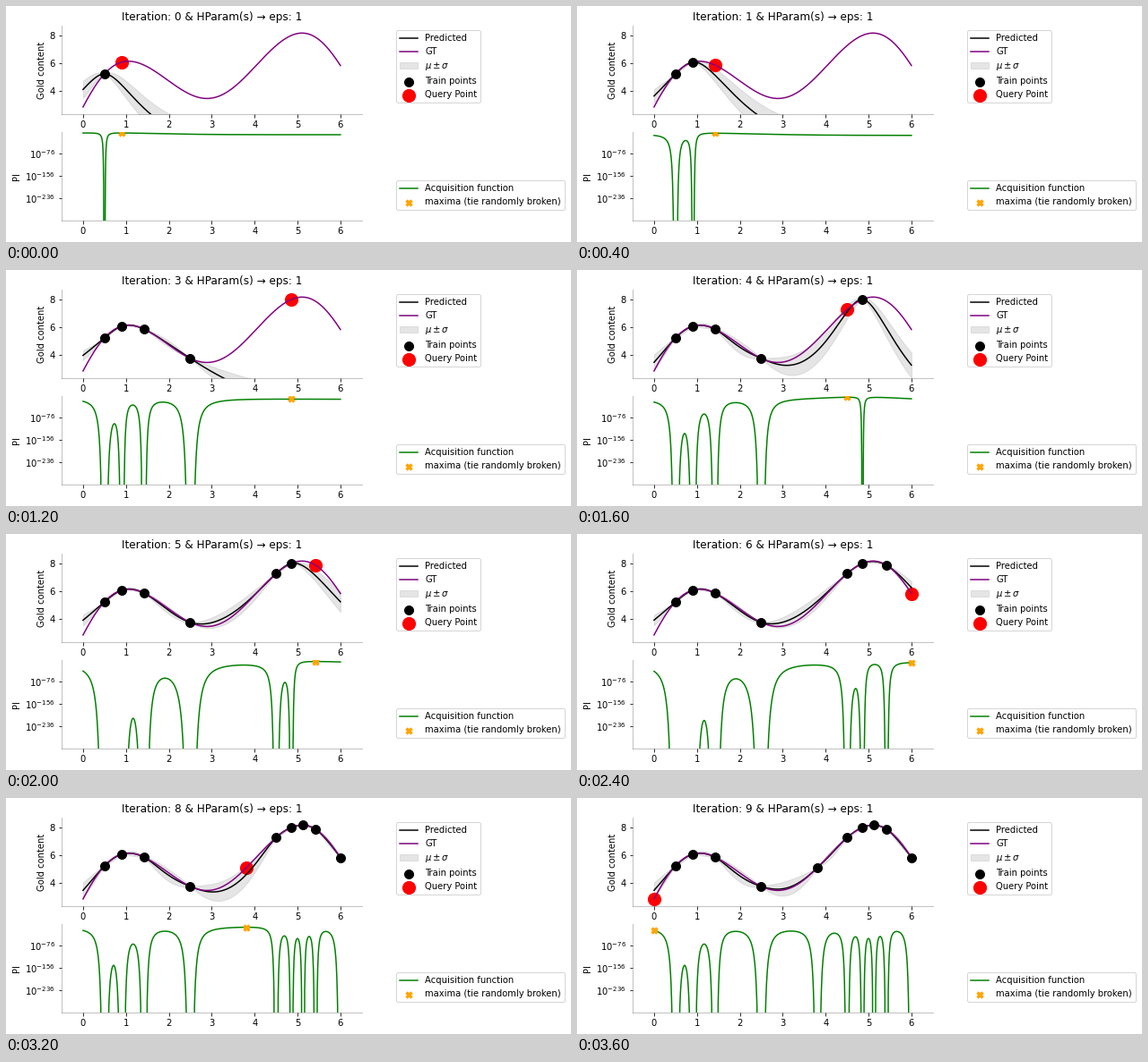
Recreate the animation shown at these times as a matplotlib script. Size 630 by 264 pixels, loop 4 s.

```python
import math

import numpy as np
import matplotlib.pyplot as plt
from matplotlib.animation import FuncAnimation

W, H, DPI = 630, 264, 72
EPS = 1
plt.rcParams["font.family"] = "DejaVu Sans"

# Surveyed gold content, smoothed into the ground-truth curve
SURVEY = np.array([
    (0, 2.85), (0.5, 5.26), (0.91, 6.1), (1.05, 6.15), (1.42, 5.89),
    (2.5, 3.76), (2.9, 3.47), (3.81, 5.12), (4.5, 7.3), (4.86, 8.02),
    (5.13, 8.2), (5.42, 7.9), (6, 5.85),
])
# Sampling order, and the kernel length scale fitted at each iteration
SAMPLES = np.array([0.5, 0.91, 1.42, 2.5, 4.86, 4.5, 5.42, 6, 5.13, 3.81, 0])
LENGTHS = [1, 1.21, 1.7, 1.7, 1, 1.53, 1.55, 1.57, 1, 1]


def rbf(a, b, length=1.2):
    return np.exp(-0.5 * ((a[:, None] - b) / length) ** 2)


def matern(a, b, length):
    s = math.sqrt(3) * np.abs(a[:, None] - b) / length
    return (1 + s) * np.exp(-s)


def ground_truth(x):
    sx, sy = SURVEY.T
    k = rbf(sx, sx) + 5e-5 * np.eye(len(sx))
    return 5.5 + rbf(x, sx) @ np.linalg.solve(k, sy - 5.5)


def posterior(x, tx, ty, length):
    k = matern(tx, tx, length) + 1e-10 * np.eye(len(tx))
    kx = matern(tx, x, length)
    w = np.linalg.solve(k, kx)
    var = 1 - np.sum(kx * w, axis=0)
    return ty @ w, np.sqrt(np.maximum(var, 1e-10))


def log_pi(mu, sigma, best):
    """log10 of the probability of improvement."""
    z = (mu - best - EPS) / sigma
    p = [0.5 * math.erfc(-v / math.sqrt(2)) for v in z]
    return np.array([math.log10(v) if v > 0 else -1000 for v in p])


xs = np.linspace(0, 6, 1001)
gt = ground_truth(xs)
sample_y = ground_truth(SAMPLES)

fig = plt.figure(figsize=(W / DPI, H / DPI), dpi=DPI, facecolor="white")


def make_axes(top, ylim, ylabel):
    height = 98.84
    ax = fig.add_axes([62 / W, 1 - (top + height) / H, 334.8 / W, height / H])
    ax.set(xlim=(-0.5, 6.5), ylim=ylim, ylabel=ylabel, xticks=range(7))
    ax.spines[["top", "right"]].set_visible(False)
    ax.spines[["left", "bottom"]].set_alpha(0.3)
    return ax


top = make_axes(22.2, (2.33, 8.72), "Gold content")
top.set_yticks([4, 6, 8])
low = make_axes(140.8, (-315.5, 0.5), "PI")
powers = [-76, -156, -236]
low.set_yticks(powers, [rf"$\mathdefault{{10^{{{p}}}}}$" for p in powers])

mean, = top.plot([], [], color="black", label="Predicted")
top.plot(xs, gt, color="purple", label="GT")
band = top.fill_between(xs, gt, gt, color="grey", alpha=0.2,
                        label=r"$\mu \pm \sigma$")
train = top.scatter([], [], s=100, color="black", zorder=10,
                    label="Train points")
query = top.scatter([], [], s=200, color="red", label="Query Point")
acq, = low.plot([], [], color="green", label="Acquisition function")
peak = low.scatter([], [], s=50, marker="X", color="orange", zorder=10,
                   label="maxima (tie randomly broken)")
top.legend(loc="upper left", bbox_to_anchor=(1.1, 1))
low.legend(loc="upper left", bbox_to_anchor=(1.1, 0.5))
title = top.set_title("")


def update(i):
    n = i + 1
    tx, ty = SAMPLES[:n], sample_y[:n]
    mu, sigma = posterior(xs, tx, ty, LENGTHS[i])
    score = log_pi(mu, sigma, ty.max())

    mean.set_data(xs, mu)
    band.set_verts([np.column_stack([
        np.r_[xs, xs[::-1]], np.r_[mu - sigma, (mu + sigma)[::-1]]])])
    train.set_offsets(np.column_stack([tx, ty]))
    query.set_offsets([(SAMPLES[n], sample_y[n])])
    acq.set_data(xs, score)
    peak.set_offsets([(SAMPLES[n], np.interp(SAMPLES[n], xs, score))])
    title.set_text(f"Iteration: {i} & HParam(s) \u2192 eps: {EPS}")
    return mean, band, train, query, acq, peak, title


anim = FuncAnimation(fig, update, frames=len(LENGTHS), interval=400,
                     repeat=True, repeat_delay=0)
plt.show()
```
